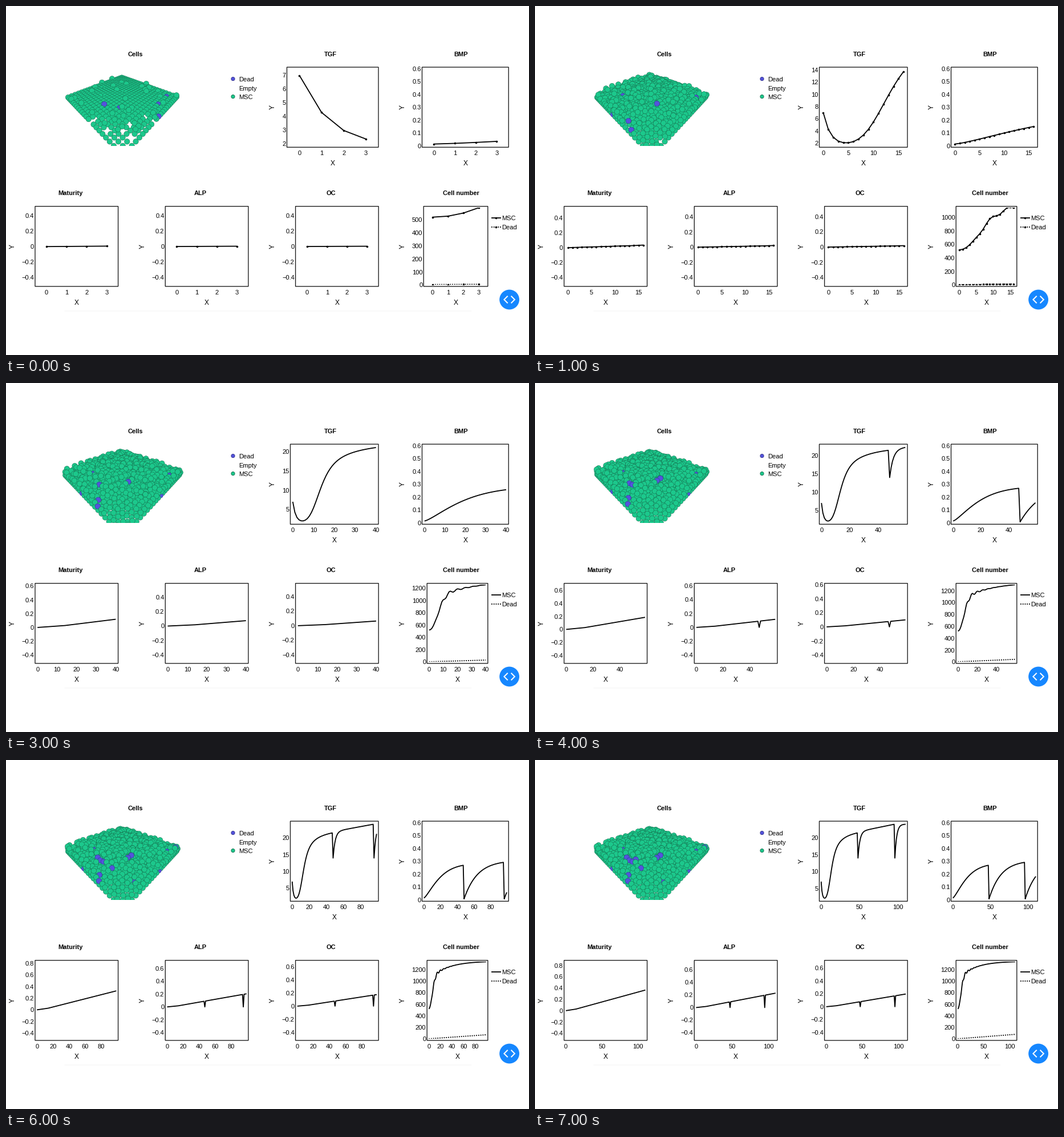
These frames come from a looping animation (917x611 px, 8 s). A matplotlib script:

```python
import math
import numpy as np
import matplotlib.pyplot as plt
from matplotlib.animation import FuncAnimation
from matplotlib.patches import Circle, Rectangle

W, H, DPI = 917, 611, 100
PT = 72 / DPI
GREEN, GREEN_EDGE = "#1cc88c", "#17704f"
BLUE, BLUE_EDGE = "#5453dd", "#33338c"
STEPS = [3, 16, 29, 40, 59, 88, 99, 110]   # last day shown at each second
RESETS = (48, 96)                          # culture medium is changed

plt.rcParams["font.family"] = "Liberation Sans"
fig = plt.figure(figsize=(W / DPI, H / DPI), dpi=DPI, facecolor="white")
ax = fig.add_axes([0, 0, 1, 1])

# ---------- data ----------
days = np.arange(111.)


def rise(x, tau, power=1):
    """Saturating growth from 0 to 1."""
    return 1 - np.exp(-(x / tau) ** power)


def tgf_series():
    hill = days ** 4.4 / (days ** 4.4 + 13 ** 4.4)
    y = 1.69 + 5.31 * np.exp(-.72 * days) + (13 + 8 * rise(days, 24)) * hill
    level = np.minimum(24.1, 19.6 + .047 * days)
    for r in RESETS:
        y[r:] = 14 + (level[r:] - 14) * rise(days[r:] - r, 2.4)
    return y


def bmp_series():
    y = .014 + .27 * rise(days, 21, 1.3)
    for r in RESETS:
        y[r:] = .007 + .3 * rise(days[r:] - r, 16)
    return y


def alive_series():
    grown = rise(days, 7.75, 2.05)
    ripple = 130 * grown ** 2 * np.exp(-days / 9) * np.cos((days - 9) * 2 * np.pi / 5.5)
    return 520 + (500 + 325 * rise(days, 30)) * grown + ripple


def dipped(y):
    y = y.copy()
    y[[r - 1 for r in RESETS]] = 0
    return y


tgf, bmp, alive = tgf_series(), bmp_series(), alive_series()
maturity = .002 * days + .0015 * np.maximum(days - 14, 0)
alp, oc = dipped(.63 * maturity), dipped(.54 * maturity)
dead = 3 + .7 * days


# ---------- drawing helpers ----------
def text(x, y, s, size=11.1, ha="center", **kw):
    ax.text(x, y + .358 * size, s, fontsize=size * PT, ha=ha, va="baseline", **kw)


def nice_step(rough):
    base = 10 ** math.floor(math.log10(rough))
    return next(m * base for m in (1, 2, 5, 10) if rough <= m * base * 1.0001)


def ticks(lo, hi, parts):
    step = nice_step((hi - lo) / parts)
    first = math.ceil(lo / step - 1e-6)
    last = math.floor(hi / step + 1e-6)
    return [(k * step, f"{round(k * step, 6):g}".replace("-", "\u2212"))
            for k in range(first, last + 1)]


def stroke(x, y, dotted=False, dots=False, clip=None):
    style = (0, (1, 1.1)) if dotted else "-"
    parts = ax.plot(x, y, color="black", lw=1.8 * PT, ls=style, dash_capstyle="butt",
                    solid_capstyle="butt", solid_joinstyle="round")
    if dots:
        parts += ax.plot(x, y, ls="none", marker="o", ms=3.6 * PT, mew=0, color="black")
    for p in parts if clip else []:
        p.set_clip_path(clip)


def panel(x0, x1, y0, last, lo, hi, lines, label_x):
    """Framed plot whose data area is x0..x1 wide and starts at y0."""
    y1, gap = y0 + 135.2, 2.5
    px = lambda v: x0 + (v + .5) / (last + 1) * (x1 - x0)
    py = lambda v: y1 - (v - lo) / (hi - lo) * (y1 - y0)
    ax.add_patch(Rectangle((x0 - gap, y0 - gap), x1 - x0 + 2 * gap, y1 - y0 + 2 * gap,
                           fill=False, ec="#1a1a1a", lw=1.35 * PT, snap=False))
    for v, s in ticks(-.5, last + .5, 5):
        text(px(v), y1 + 12.4, s)
    for v, s in ticks(lo, hi, 7):
        text(x0 - 4.4, py(v), s, ha="right")
    text((x0 + x1) / 2, y1 + 30.4, "X", 12)
    ax.text(label_x, (y0 + y1) / 2, "Y", fontsize=12 * PT, rotation=90, ha="center", va="center")
    clip = Rectangle((x0, y0), x1 - x0, y1 - y0, transform=ax.transData)
    for data, dotted in lines:
        stroke(px(days[:last + 1]), py(data[:last + 1]), dotted, last < 20, clip)


# ---------- cell lattice ----------
N = 23
rng = np.random.default_rng(4)
grid = np.array([(i, s - i, k) for s in range(2 * N - 1) for k in range(3)
                 for i in range(N) if 0 <= s - i < N])
layer = grid[:, 2]
depth = (grid[:, 0] + grid[:, 1]) / (2 * N - 2)   # 0 at the back, 1 in front
rank = rng.random(len(grid))
jitter = rng.normal(0, .9, (len(grid), 2)) * (layer > 0)[:, None]


def project(cells):
    """Perspective map of the square lattice, seen along its diagonal."""
    top, right, front, left = map(np.array, ((203, 125.5), (299, 159), (205, 262), (109, 160)))
    cross = lambda a, b: a[0] * b[1] - a[1] * b[0]
    d1, d2, s = right - front, left - front, top - right + front - left
    g, h = cross(s, d2) / cross(d1, d2), cross(d1, s) / cross(d1, d2)
    u, v = cells[:, :1] / (N - 1), cells[:, 1:2] / (N - 1)
    z = cells[:, 2:]
    w = 1 + g * u + h * v
    p = ((right * (1 + g) - top) * u + (left * (1 + h) - top) * v + top) / w
    return p + np.hstack([(p[:, :1] - 204) * .013 * z, -3.2 * z / w])


base = project(grid) + jitter

EARLY_DEAD = [(171, 175), (195, 178), (199, 181), (271, 171), (285, 158), (268, 193)]
# in order of death
LATE_DEAD = [(157, 155), (163, 199), (166, 213), (135, 190), (214, 173), (280, 159), (270, 194),
             (165, 177), (172, 177), (218, 170), (161, 173), (187, 190), (301, 154), (227, 210),
             (175, 173)]


def draw_cells(last):
    if last < 10:
        density = [np.where(depth > .74, .88, .99), np.where(depth > .74, .2, .06), 0 * depth]
        spots = EARLY_DEAD
    else:
        third = (.2 + .3 * rise(last - 16, 12)) * (depth < .82)
        density = [1 + 0 * depth, .9 + .1 * (last > 20) + 0 * depth, third]
        spots = LATE_DEAD[:5 + last // 11]
    pos = base[rank < np.choose(layer, density)]
    face = np.full(len(pos), GREEN, dtype=object)
    edge = np.full(len(pos), GREEN_EDGE, dtype=object)
    for spot in spots:
        dist = np.hypot(*(pos - spot).T)
        near = np.flatnonzero(dist < 4)
        pick = near[-1] if len(near) else dist.argmin()
        face[pick], edge[pick] = BLUE, BLUE_EDGE
    if last == 40:   # camera moves closer for one step
        pos = (pos - (204, 130)) * 1.05 + (204, 130)
    dots = ax.scatter(pos[:, 0], pos[:, 1], s=(9.4 * PT) ** 2, c=list(face),
                      edgecolors=list(edge), linewidths=.55 * PT)
    dots.set_clip_path(Rectangle((40, 90), 340, 155, transform=ax.transData))


# ---------- page ----------
def draw_legends(last):
    for y, name, face, edge in ((128, "Dead", BLUE, BLUE_EDGE), (143.7, "Empty", None, None),
                                (159, "MSC", GREEN, GREEN_EDGE)):
        if face:
            ax.add_patch(Circle((398, y - .4), 3.1, fc=face, ec=edge, lw=.9 * PT))
        text(408.5, y, name, ha="left")
    for y, name, dotted in ((371.3, "MSC", False), (387.2, "Dead", True)):
        stroke([851, 867.5], [y, y], dotted)
        if last < 20:
            ax.plot(859.2, y, "o", ms=3.6 * PT, mew=0, color="black")
        text(869.6, y, name, ha="left")


def draw_titles():
    for y, first, names in ((84, 2, ("TGF", "BMP")),
                            (327.5, 0, ("Maturity", "ALP", "OC", "Cell number"))):
        for k, name in enumerate(names, first):
            text(113 + 228.2 * k, y, name, 11, weight="bold")
    text(227, 84, "Cells", 11, weight="bold")


def draw_button():
    ax.add_patch(Circle((882.6, 514), 17.4, fc="#1687ff", ec="none"))
    for x, d in ((879, -5.6), (886.3, 5.6)):
        ax.plot([x, x + d, x], [508.4, 514, 519.6], color="white", lw=2 * PT,
                solid_joinstyle="miter")


def draw(n):
    last = STEPS[n]
    ax.clear()
    ax.set(xlim=(0, W), ylim=(H, 0))
    ax.axis("off")
    ax.plot([104, 815], [534, 534], color="#fafafa", lw=2.5 * PT)
    draw_titles()
    draw_cells(last)

    shown = tgf[:last + 1]
    shift = 0 if last < 10 else 6   # wider tick labels push the frame
    panel(495 + shift, 650.5, 109.6, last, shown.min() - .5, shown.max() + .5,
          [(tgf, False)], 468)
    panel(732, 878.7, 109.6, last, 0, .6, [(bmp, False)], 696)
    for k, data in enumerate((maturity, alp, oc)):
        x0 = 53.5 + 228.3 * k
        panel(x0, x0 + 140.6, 353.2, last, -.5, data[:last + 1].max() + .5,
              [(data, False)], 12 + 228 * k)
    panel(734.7 + shift, 842.3, 353.2, last, 0, alive[last],
          [(alive, False), (dead, True)], 696)
    draw_legends(last)
    draw_button()
    return []


anim = FuncAnimation(fig, draw, frames=len(STEPS), interval=1000, repeat=True, repeat_delay=0,
                     init_func=lambda: draw(0), blit=False)
plt.show()
```
